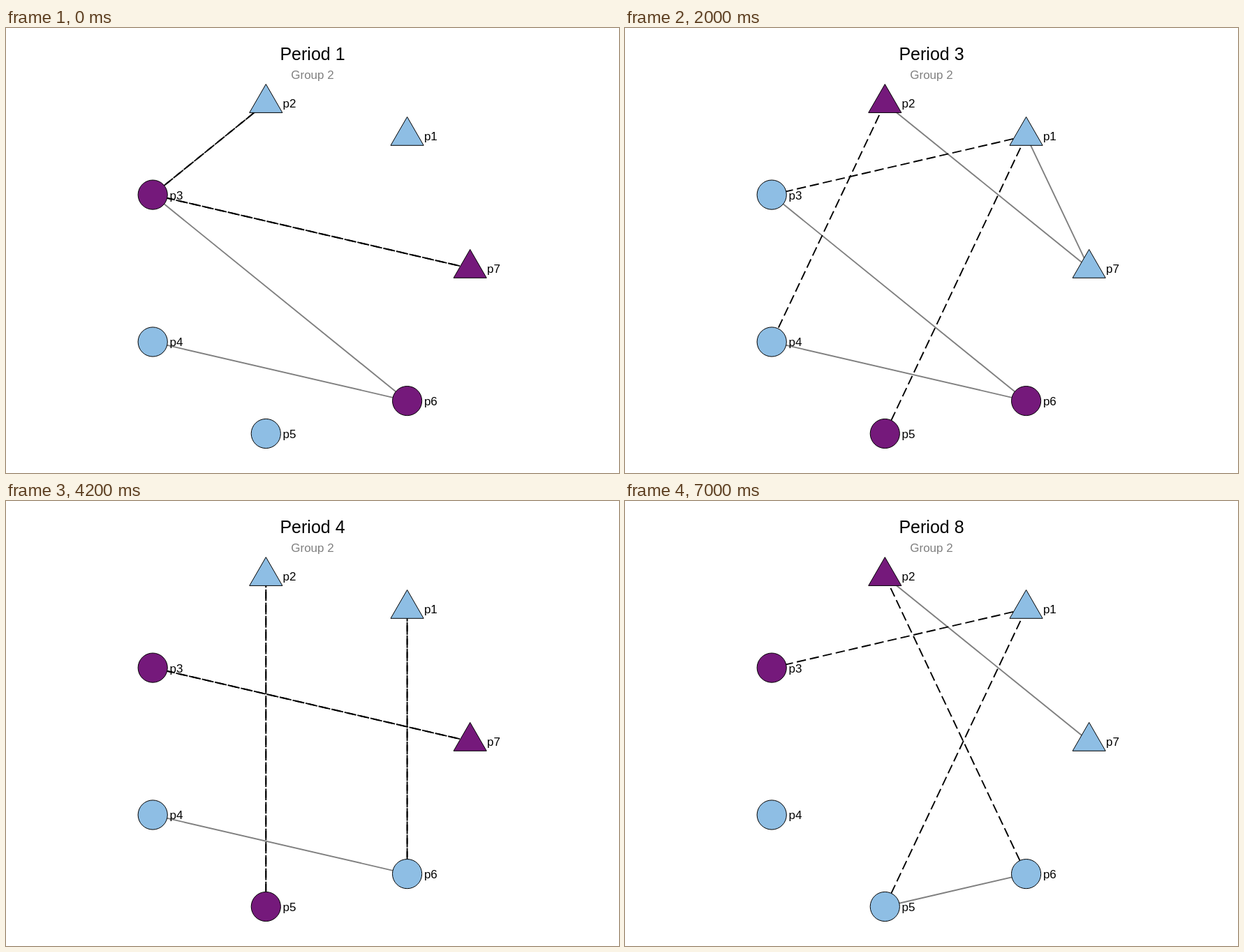
These frames come from a looping animation (878x638 px, 8000 ms). An HTML page:

```html
<!DOCTYPE html>
<html lang="en">
<head>
<meta charset="utf-8">
<title>Group network by period</title>
<style>
  html, body { margin: 0; width: 100%; height: 100%; overflow: hidden; background: #fff; }
  svg { display: block; width: 878px; height: 638px; }
  text { font-family: "Liberation Sans", Arial, Helvetica, sans-serif; font-size: 17px; }
  .title { font-size: 25px; text-anchor: middle; }
  .group { fill: #7f7f7f; text-anchor: middle; }
  .node { fill: #8ebee4; stroke: #000; stroke-width: 1; }
  .node.on { fill: #75197b; }
  .edge { stroke-width: 1.905; }
  .same { stroke: #7f7f7f; }
  .cross { stroke: #000; stroke-dasharray: 13.335 5.715; }
</style>
</head>
<body>
<svg viewBox="0 0 878 638">
  <text class="title" x="439" y="46"></text>
  <text class="group" x="439" y="73">Group 2</text>
  <g id="edges"></g>
  <g id="nodes"></g>
</svg>
<script>
const nodes = {
  1: [574.6, 154.6], 2: [372.3, 107.7], 3: [210.2, 239.1], 4: [210.2, 450],
  5: [372.3, 581.5], 6: [574.6, 534.6], 7: [664.7, 344.6]
};
const triangles = "127";

// Links: "a~b" plain, "a-b" dashed from a, "a=b" dashed from both ends.
const periods = {
  1: { on: "367", links: "3~6 4~6 2=3 7=3" },
  2: { on: "456", links: "1~7 2~7 3~4 4~5 1-4 7=3" },
  3: { on: "256", links: "1~7 2~7 3~6 4~6 1-3 1-5 2-4" },
  4: { on: "357", links: "4~6 1=6 2=5 7=3" },
  6: { on: "2357", links: "1~2 1~7 2~7 4~6 1-3 1-4 2-5 7-5 7=6" },
  7: { on: "245", links: "1~2 3~5 7=6" },
  8: { on: "23", links: "2~7 5~6 1-3 1-5 2-6" }
};
const schedule = [1, 2, 3, 4, 4, 6, 7, 8];

const title = document.querySelector(".title");
const edgeLayer = document.getElementById("edges");
const nodeLayer = document.getElementById("nodes");

function add(parent, tag, attrs) {
  const el = document.createElementNS("http://www.w3.org/2000/svg", tag);
  for (const key in attrs) el.setAttribute(key, attrs[key]);
  return parent.appendChild(el);
}

function addEdge(a, b, kind) {
  const [x1, y1] = nodes[a], [x2, y2] = nodes[b];
  add(edgeLayer, "line", { x1, y1, x2, y2, class: "edge " + kind });
}

const shapes = {};
for (const id in nodes) {
  const [x, y] = nodes[id];
  shapes[id] = triangles.includes(id)
    ? add(nodeLayer, "path", { class: "node", d: `M${x} ${y - 27.2}l23.6 40.9h-47.2z` })
    : add(nodeLayer, "circle", { class: "node", cx: x, cy: y, r: 21.1 });
  add(nodeLayer, "text", { x: x + 24.3, y: y + 6.4 }).textContent = "p" + id;
}

function show(period) {
  const { on, links } = periods[period];
  title.textContent = "Period " + period;
  for (const id in shapes) shapes[id].classList.toggle("on", on.includes(id));
  edgeLayer.replaceChildren();
  for (const [a, type, b] of links.split(" ")) {
    addEdge(a, b, type === "~" ? "same" : "cross");
    if (type === "=") addEdge(b, a, "cross");
  }
}

let current;
function tick() {
  const period = schedule[Math.floor(performance.now() / 1000) % schedule.length];
  if (period !== current) show(current = period);
  requestAnimationFrame(tick);
}
tick();
</script>
</body>
</html>
```
